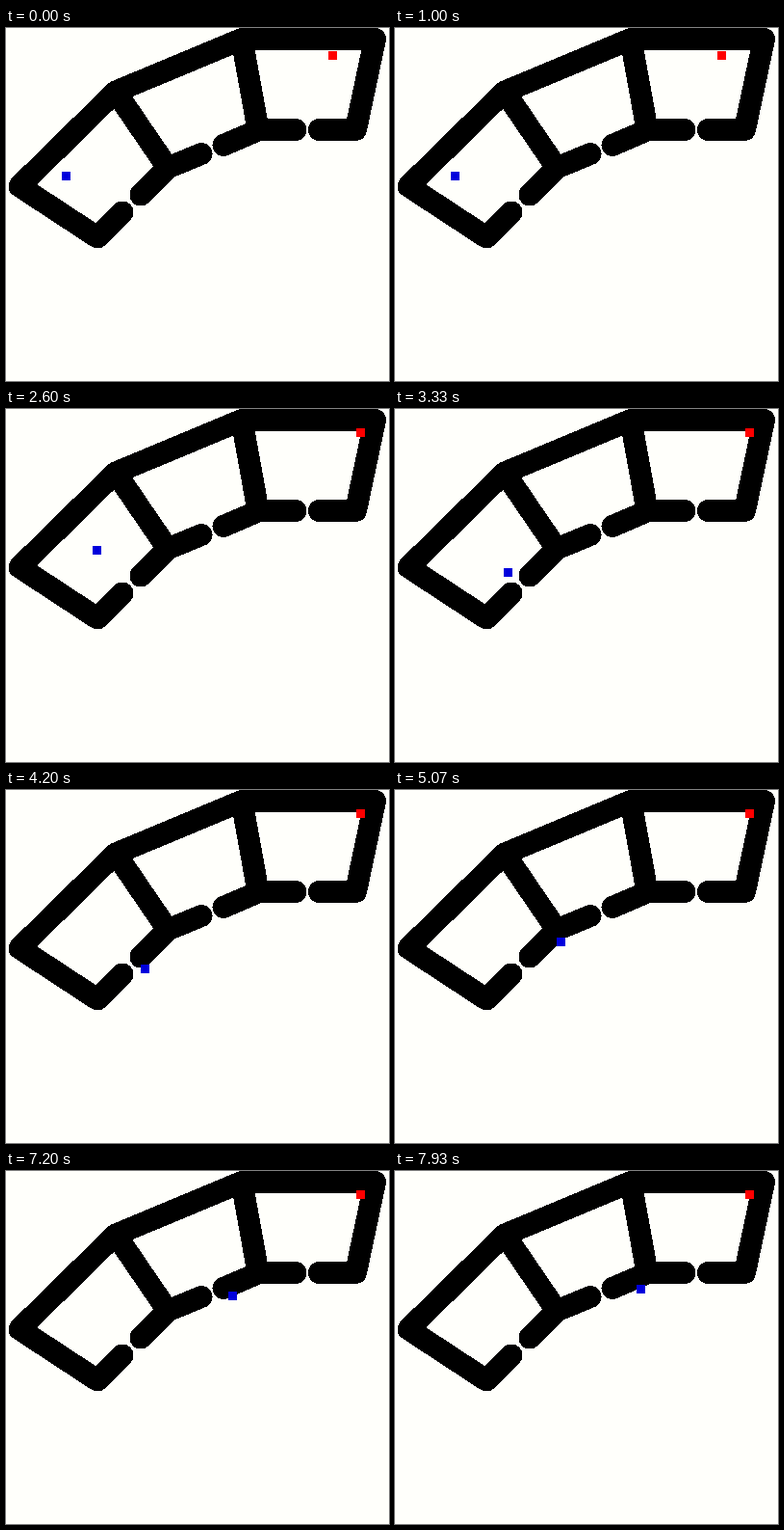
Recreate the animation shown at these times as an HTML page. Size 398 by 366 pixels, loop 8 s.

```html
<!DOCTYPE html>
<html lang="en">
<head>
<meta charset="utf-8">
<title>Rooms</title>
<style>
  html, body { margin: 0; width: 100%; height: 100%; overflow: hidden; background: #fffffb; }
  svg { display: block; }
  .walls { fill: none; stroke: #000; stroke-width: 23; stroke-linecap: round; stroke-linejoin: round; }
</style>
</head>
<body>
<svg width="398" height="366" viewBox="0 0 398 366" shape-rendering="crispEdges">
  <g class="walls">
    <path d="M121 191 L95 217 L14 164 L114 66 L245 11.5 H383.5 L363.5 105.5 H325.5"/>
    <path d="M140 173 L168 145 L203 130.5 M114 66 L168 145"/>
    <path d="M226 121.5 L263 105.5 H301 M245 11.5 L262 105.5"/>
  </g>
  <rect id="blue" width="9" height="9" fill="#0000dc"/>
  <rect id="red" width="9" height="9" fill="#f00"/>
</svg>
<script>
const LOOP = 8000, STEPS = 120;

// Waypoints: [step, centre x, centre y]
const bluePath = [
  [16.6, 62, 153], [29.4, 89, 126], [36.6, 89, 141], [50, 117, 169],
  [60.2, 138.5, 190.5], [76, 172, 157], [97, 214, 136], [119, 255, 122], [120, 257, 121]
];
const redPath = [[16.6, 339, 28], [29, 364, 28], [31, 368, 24]];

function positionAt(path, step) {
  if (step <= path[0][0]) return path[0].slice(1);
  const next = path.findIndex(point => point[0] >= step);
  if (next < 0) return path[path.length - 1].slice(1);
  const [s0, x0, y0] = path[next - 1], [s1, x1, y1] = path[next];
  const k = (step - s0) / (s1 - s0);
  return [x0 + (x1 - x0) * k, y0 + (y1 - y0) * k];
}

function place(id, path, step) {
  const [x, y] = positionAt(path, step);
  const square = document.getElementById(id);
  square.setAttribute("x", Math.round(x) - 4);
  square.setAttribute("y", Math.round(y) - 4);
}

const start = performance.now();
function draw() {
  const time = (performance.now() - start) % LOOP;
  const step = Math.floor(time / LOOP * STEPS + 0.1) % STEPS;
  place("blue", bluePath, step);
  place("red", redPath, step);
  requestAnimationFrame(draw);
}
draw();
</script>
</body>
</html>
```
